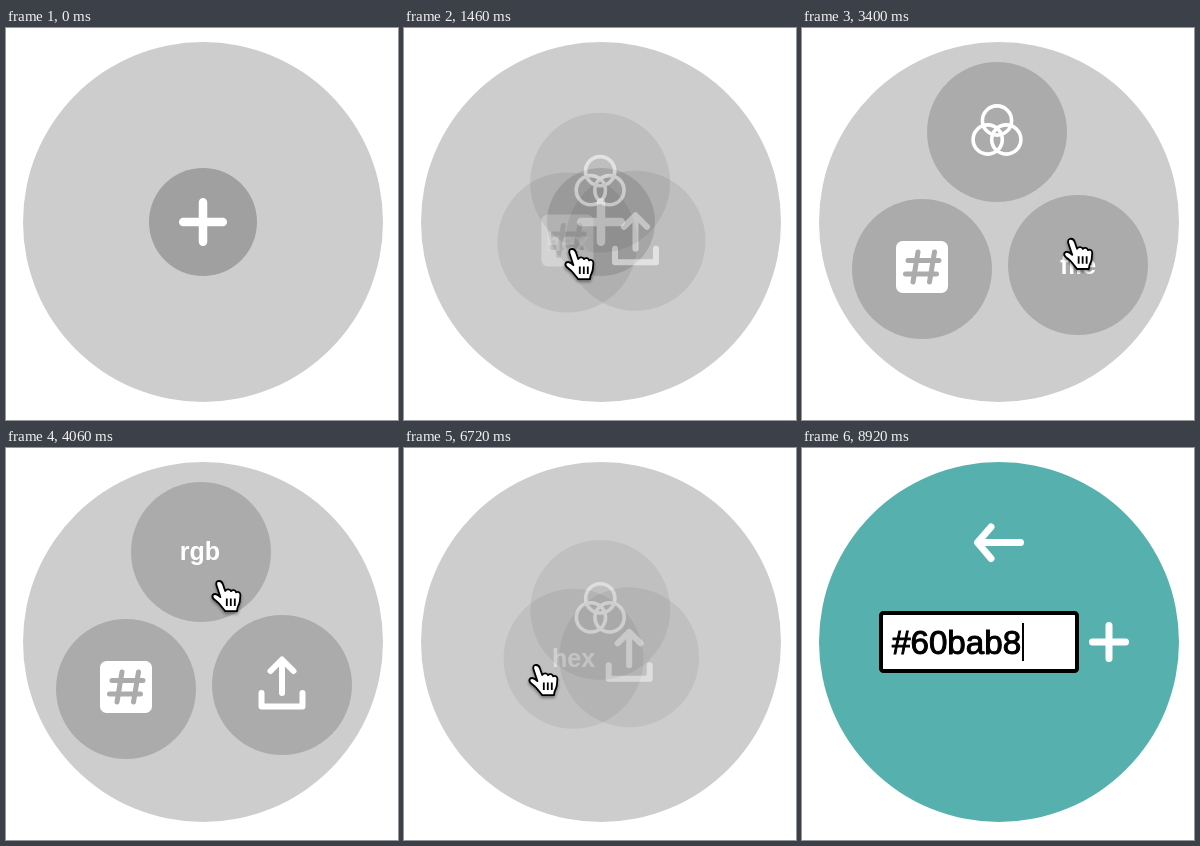
Animation, 392 px wide and 392 px high, one loop 9420 ms. Source, as an HTML page:

```html
<!DOCTYPE html>
<html lang="en">
<head>
<meta charset="utf-8">
<title>Colour picker</title>
<style>
  html, body { margin: 0; width: 100%; height: 100%; overflow: hidden; background: #fff; }
  svg { display: block; width: 100%; height: 100%; }
  .line { fill: none; stroke: #fff; stroke-linecap: round; stroke-linejoin: round; }
  .shade { fill: #000; fill-opacity: .166; }
  .label { font: bold 25px "Liberation Sans", Arial, sans-serif; fill: #fff; text-anchor: middle; }
  .value { font: 33.2px "Liberation Sans", Arial, sans-serif; stroke: #000; stroke-width: 1; }
  #pointer { filter: drop-shadow(0 2px 1.5px rgba(0, 0, 0, .4)); }
</style>
</head>
<body>
<svg viewBox="0 0 392 392">
  <circle id="disc" cx="197" cy="194" r="180"/>

  <g id="add">
    <circle cx="197" cy="194" r="54" fill="#a0a0a0"/>
    <path class="line" stroke-width="8.5" d="M177.2 194h39.6M197 174.2v39.6"/>
  </g>

  <g id="hex">
    <circle class="shade" r="70"/>
    <g class="icon">
      <rect x="-26" y="-28" width="52" height="52" rx="6.5" fill="#fff"/>
      <path class="line" style="stroke:#ababab" stroke-width="5" d="M-4 -17L-9 13M12.5 -17L7.5 13M-14 -8.5H17M-16.5 5H14.5"/>
    </g>
    <text class="label" y="8.5">hex</text>
  </g>
  <g id="file">
    <circle class="shade" r="70"/>
    <g class="icon line" stroke-width="6">
      <path d="M0 8V-24M-11.5 -14L0 -25.5L11.5 -14"/>
      <path d="M-20.5 8V21.5H20.5V8"/>
    </g>
    <text class="label" y="8.5">file</text>
  </g>
  <g id="rgb">
    <circle class="shade" r="70"/>
    <g class="icon line" stroke-width="3.6">
      <circle cy="-11.5" r="14.6"/>
      <circle cx="-9.3" cy="7.5" r="14.6"/>
      <circle cx="9.3" cy="7.5" r="14.6"/>
    </g>
    <text class="label" x="-1" y="8">rgb</text>
  </g>

  <g id="form">
    <path class="line" stroke-width="7" d="M218.5 94.5H177M189 79L175.5 94.5L189 110.5"/>
    <path class="line" stroke-width="7" d="M290.5 194h33M307 177.5v33"/>
    <rect x="79" y="165" width="196" height="58" rx="2.5" fill="#fff" stroke="#000" stroke-width="4"/>
    <text id="value" class="value" x="90" y="206">#60bab8</text>
    <rect id="caret" x="220" y="175" width="2" height="38"/>
  </g>

  <g id="pointer">
    <path id="arrow" d="M1 1.5V30L7.5 24L12.5 36L17.5 34L12.5 22.5H21.5Z" stroke="#fff" stroke-width="2.2"/>
    <g id="hand" transform="translate(-7)" stroke="#000" stroke-width="1.8" stroke-linejoin="round">
      <path fill="#fff" d="M6.8 1.2C9.5 .4 11.2 2 12 4.5L14.2 11C15.5 8.6 19.3 8.8 20 11.2C21.5 9.4 24.5 9.8 25.2 12.4C27 11 29.4 12.3 29.4 15L28.8 21.5C28.3 25 26.8 26 26.4 28.5L26 31.2H14.2C11.5 28 8.5 23.5 4.8 20.8C1.5 18.5 .8 16.6 1.8 15C3.6 13.2 6.5 14.2 9.4 17L5.8 6.4C4.8 3.6 5 1.9 6.8 1.2Z"/>
      <path fill="none" d="M15.8 18.5V26M19.8 18.5V26M23.8 18.5V26"/>
    </g>
    <g id="beam" fill="none" stroke-linecap="round">
      <path id="bar" d="M-6 -16Q0 -16 0 -11Q0 -16 6 -16M0 -11V11M-6 16Q0 16 0 11Q0 16 6 16M-3 3H3"/>
      <use href="#bar" stroke="#fff" stroke-width="4"/>
      <use href="#bar" stroke="#000" stroke-width="2"/>
    </g>
  </g>
</svg>
<script>
const LOOP = 9420, FADE = 300, OPEN = 1330, CLOSE = 6528, FORM = 6820, PASTE = 7680;
const CENTER = [197, 194];
const $ = id => document.getElementById(id);

// home position and hover intervals of each option
const items = [
  { id: 'rgb', home: [195, 104], hovers: [[3740, 5405]] },
  { id: 'file', home: [276, 237], hovers: [[2430, 3640]] },
  { id: 'hex', home: [120, 241], hovers: [[OPEN, 1860], [5520, LOOP]] }
].map(item => {
  const el = $(item.id);
  return { ...item, el, icon: el.querySelector('.icon'), label: el.querySelector('.label') };
});

// each pointer move eases from the last place to a new one
const entry = [9, 338];
const moves = [
  { from: 700, until: 1180, to: [167, 220] },
  { from: 1780, until: 2000, to: [185, 191] },
  { from: 2180, until: 2250, to: [200, 191] },
  { from: 2250, until: 2680, to: [268, 210] },
  { from: 3380, until: 4060, to: [212, 132] },
  { from: 4880, until: 5820, to: [133, 206] },
  { from: 5820, until: 6000, to: [131, 216] },
  { from: 7000, until: 7360, to: [151, 193] },
  { from: 8200, until: 8320, to: [80, 5] }
];

const ramp = (t, start, length = FADE) => Math.min(1, Math.max(0, (t - start) / length));
const ease = p => p * p * (3 - 2 * p);
const mix = (a, b, p) => a + (b - a) * p;
const mixPoint = (a, b, p) => a.map((v, k) => mix(v, b[k], p));
const show = (el, on) => { el.style.display = on ? '' : 'none'; };
const inside = ([x, y], [cx, cy], r) => Math.hypot(x - cx, y - cy) < r;

const pointerAt = t => moves.reduce(
  (pos, { from, until, to }) => mixPoint(pos, to, ease(ramp(t, from, until - from))), entry);

function drawPointer(t) {
  const pos = pointerAt(t), [x, y] = pos;
  const onHand = t < OPEN ? inside(pos, CENTER, 55)
    : t < FORM && items.some(item => inside(pos, item.home, 70));
  const onBeam = t >= FORM && x > 77 && x < 277 && y > 163 && y < 225;
  show($('pointer'), (t >= 700 && t < PASTE) || (t >= 8200 && t < 8325));
  $('pointer').setAttribute('transform', `translate(${x} ${y})`);
  show($('hand'), onHand);
  show($('beam'), onBeam);
  show($('arrow'), !onHand && !onBeam);
}

function draw(t) {
  const spread = ramp(t, OPEN) - ramp(t, CLOSE);
  $('add').style.opacity = 1 - ramp(t, OPEN);

  for (const { el, icon, label, home, hovers } of items) {
    const hover = hovers.reduce((sum, [on, off]) => sum + ramp(t, on) - ramp(t, off), 0);
    el.setAttribute('transform', `translate(${mixPoint(CENTER, home, spread)})`);
    el.style.opacity = spread;
    icon.style.opacity = 1 - hover;
    label.style.opacity = hover;
  }

  const color = mixPoint([205, 205, 205], [86, 177, 174], ramp(t, PASTE, 260));
  $('disc').setAttribute('fill', `rgb(${color.map(Math.round)})`);
  show($('form'), t >= FORM);
  show($('value'), t >= PASTE);
  show($('caret'), (t >= PASTE && t < 8300) || t >= 8920);
  drawPointer(t);
}

const start = performance.now();
function tick() {
  draw((performance.now() - start) % LOOP);
  requestAnimationFrame(tick);
}
tick();
</script>
</body>
</html>
```
